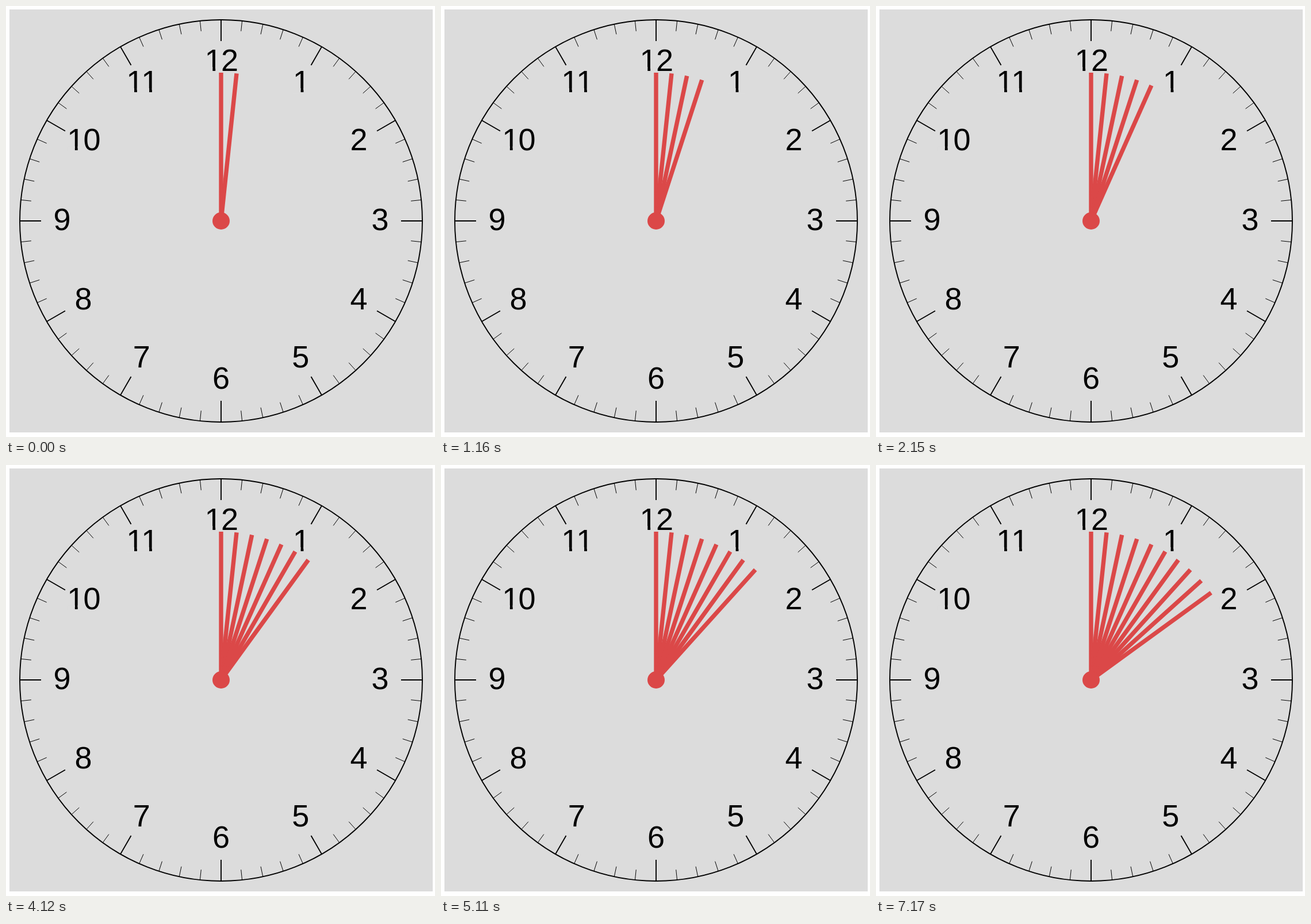
These frames come from a looping animation (746x750 px, 8000 ms). An HTML page with a canvas:

```html
<!DOCTYPE html>
<html lang="en">
<head>
<meta charset="utf-8">
<title>Clock hands</title>
<style>
  html, body { margin: 0; width: 100%; height: 100%; overflow: hidden; background: #fff; }
  canvas { display: block; }
</style>
</head>
<body>
<canvas id="stage" width="746" height="750"></canvas>
<script>
const ctx = document.getElementById('stage').getContext('2d');
const LOOP = 8000, C = 374, SIZE = 54;
const FACE = '#dcdcdc', RED = '#db4848';
const STEPS = [170, 1160, 2150, 3130, 4120, 5110, 6190, 7170];

// A radial line at the given minute, between two radii.
function spoke(minute, r1, r2, width, color) {
  const a = minute * Math.PI / 30, x = Math.sin(a), y = -Math.cos(a);
  ctx.lineWidth = width;
  ctx.strokeStyle = color;
  ctx.beginPath();
  ctx.moveTo(C + x * r1, C + y * r1);
  ctx.lineTo(C + x * r2, C + y * r2);
  ctx.stroke();
}

function disc(r) {
  ctx.beginPath();
  ctx.arc(C, C, r, 0, 2 * Math.PI);
}

// Draws one digit; the "1" is trimmed to a plain stem without a foot.
function digit(d, x, y) {
  if (d === '1') x += SIZE * 0.03;
  ctx.fillStyle = '#000';
  ctx.fillText(d, x, y);
  if (d !== '1') return;
  ctx.fillStyle = FACE;
  ctx.fillRect(x, y - 7, SIZE * 0.254, 9);
  ctx.fillRect(x + SIZE * 0.343, y - 7, SIZE * 0.2, 9);
}

function label(hour) {
  const a = hour * Math.PI / 6, text = String(hour);
  const advance = SIZE * (hour === 11 ? 0.482 : 0.556);
  const width = advance * (text.length - 1) + SIZE * 0.556;
  const x = C + 276.5 * Math.sin(a) - width / 2;
  const y = 389.5 - 276.5 * Math.cos(a);
  [...text].forEach((d, i) => digit(d, x + i * advance, y));
}

function drawFace() {
  ctx.fillStyle = '#fff';
  ctx.fillRect(0, 0, 746, 750);
  ctx.fillStyle = FACE;
  ctx.fillRect(6, 6, 736, 736);
  ctx.lineWidth = 1.9;
  ctx.strokeStyle = '#000';
  disc(350);
  ctx.stroke();
  for (let m = 0; m < 60; m++) {
    if (m % 5) spoke(m, 332, 350, 1, '#000');
    else spoke(m, 313, 350, 1.9, '#000');
  }
  ctx.font = SIZE + 'px "Liberation Sans", Arial, sans-serif';
  for (let h = 1; h <= 12; h++) label(h);
}

function draw(now) {
  const t = now % LOOP;
  const last = 1 + STEPS.filter(s => t >= s).length;
  drawFace();
  for (let m = 0; m <= last; m++) spoke(m, 0, 258, 7.4, RED);
  ctx.fillStyle = RED;
  disc(15);
  ctx.fill();
}

const start = performance.now();
function tick() {
  draw(performance.now() - start);
  requestAnimationFrame(tick);
}
tick();
</script>
</body>
</html>
```
